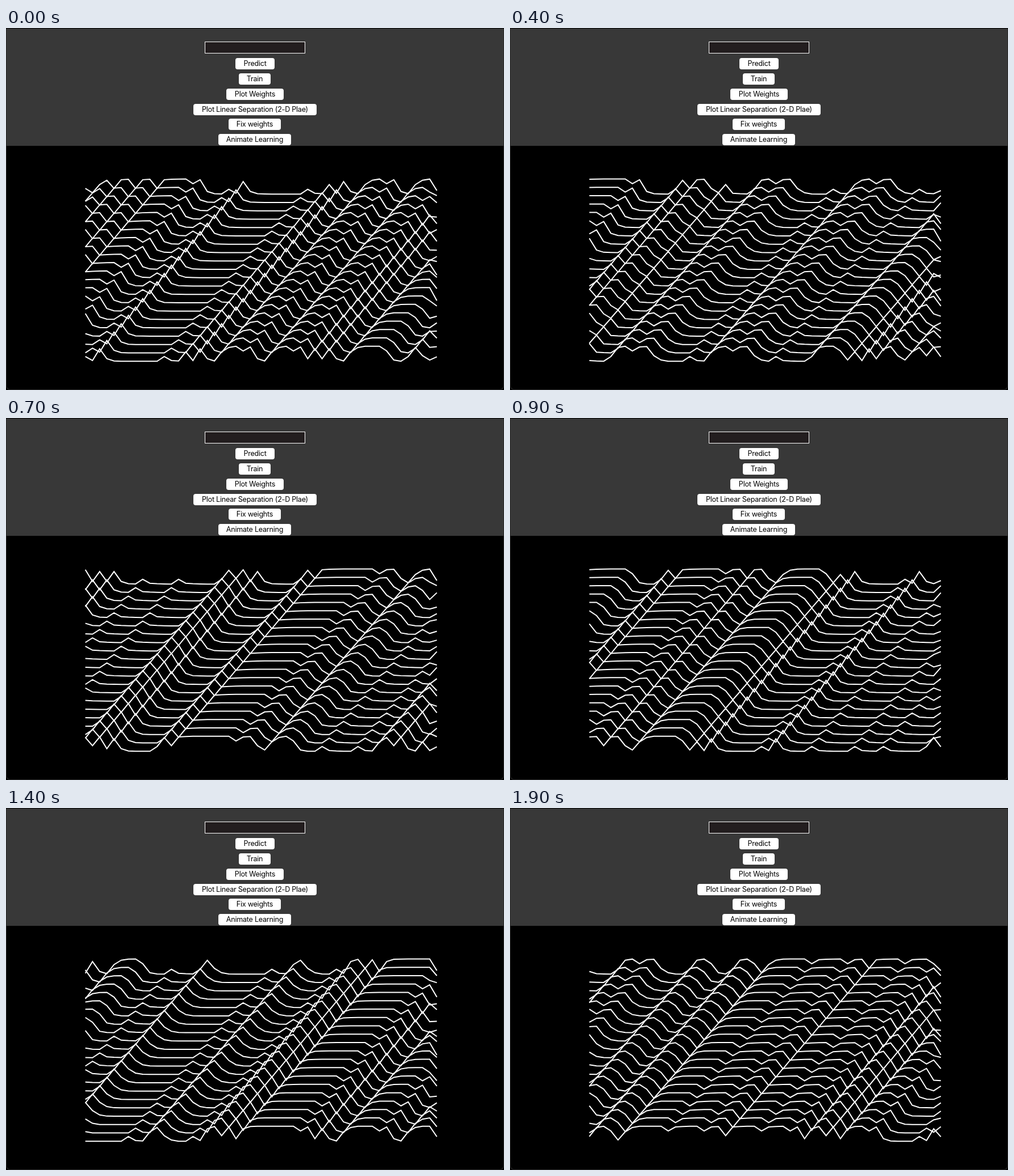
An HTML page with a canvas for the animation above (2 s loop, 877 px wide and 639 px high).

```html
<!DOCTYPE html>
<html lang="en">
<head>
<meta charset="utf-8">
<title>Learning waves</title>
<style>
  html, body { margin: 0; width: 100%; height: 100%; overflow: hidden; background: #000; }
  #panel { position: absolute; left: 0; top: 1px; width: 876px; height: 207px; background: #383838; }
  #field { position: absolute; left: 350px; top: 24px; width: 175px; height: 19px; border: 1px solid #fff; background: #231e1f; }
  #outline {
    position: absolute; left: 0; top: 1px; width: 875px; height: 637px; box-sizing: content-box;
    border: 1px solid #2a2a2a; border-top: 0; border-radius: 0 0 8px 8px;
  }
  .button {
    position: absolute; height: 20px; line-height: 19.5px; border-radius: 4px;
    background: #fff; color: #000; text-align: center; white-space: nowrap;
    font-family: Inter, sans-serif; font-size: 12.6px; letter-spacing: -.02em;
  }
  canvas { position: absolute; left: 0; top: 208px; }
</style>
</head>
<body>
<div id="panel"></div>
<div id="field"></div>
<canvas id="waves" width="877" height="431"></canvas>
<div id="outline"></div>
<script>
const buttons = [
  ["Predict", 69], ["Train", 56], ["Plot Weights", 101],
  ["Plot Linear Separation (2-D Plae)", 217], ["Fix weights", 92], ["Animate Learning", 128]
];
buttons.forEach(([label, width], i) => {
  const el = document.createElement("div");
  el.className = "button";
  el.textContent = label;
  el.style.left = Math.floor(438.5 - width / 2) + "px";
  el.style.top = Math.round(53.4 + i * 26.7) + "px";
  el.style.width = width + "px";
  document.body.append(el);
});

const COLS = 50, ROWS = 21, STEPS = 20, STEP_MS = 100;
const LEFT = 139.7, STEP_X = 12.634, TOP = 279.8, STEP_Y = 14.76, HEIGHT = 13.4;

function seededRandom(seed) {
  let state = seed * 7919 + 17;
  const next = () => (state = (state * 16807) % 2147483647) / 2147483647;
  for (let i = 0; i < 5; i++) next();
  return next;
}

// Each height is the squashed, weighted sum of four neighbouring random signs.
function buildWave(step) {
  const random = seededRandom(step + 1);
  const signs = Array.from({ length: COLS + ROWS + 3 }, () => random() < .5 ? -1 : 1);
  return signs.slice(3).map((sign, i) =>
    HEIGHT * Math.tanh(1.3 * (sign + .6 * signs[i + 2] + .45 * signs[i + 1] + .25 * signs[i])));
}

const waves = Array.from({ length: STEPS }, (_, step) => buildWave(step));

// The right-hand ends stay put and hang mostly below the middle of their rows.
const endRandom = seededRandom(50);
const rowEnds = Array.from({ length: ROWS }, () => 13 * Math.sqrt(endRandom()) - 3);

const ctx = document.getElementById("waves").getContext("2d");
ctx.translate(0, -208);
ctx.strokeStyle = "#fff";
ctx.lineWidth = 2;

function draw(step) {
  ctx.clearRect(0, 208, 877, 431);
  for (let row = 0; row < ROWS; row++) {
    ctx.beginPath();
    for (let col = 0; col < COLS; col++) {
      const offset = col === COLS - 1 ? rowEnds[row] : waves[step][row + col];
      ctx.lineTo(LEFT + col * STEP_X, TOP + row * STEP_Y + offset);
    }
    ctx.stroke();
  }
}

const start = performance.now();
function tick() {
  draw(Math.floor((performance.now() - start) / STEP_MS) % STEPS);
  requestAnimationFrame(tick);
}
tick();
</script>
</body>
</html>
```
